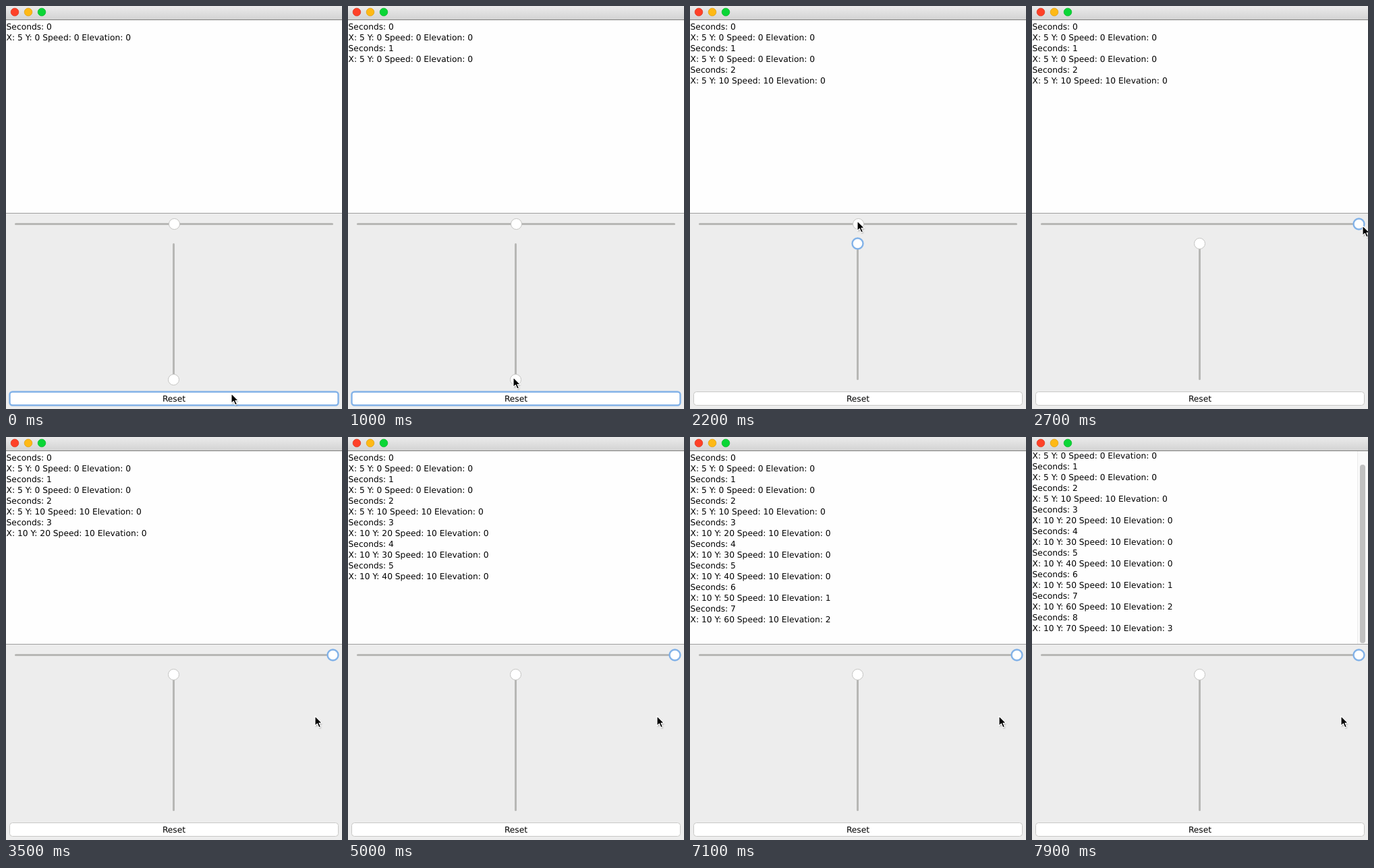
Write an HTML page that moves like this. It is 498 px wide and 598 px high and loops after 8000 ms.

```html
<!DOCTYPE html>
<html lang="en">
<head>
<meta charset="utf-8">
<title>Slider log</title>
<style>
  html, body { margin: 0; width: 100%; height: 100%; overflow: hidden; background: #ededed; }
  svg { display: block; width: 498px; height: 598px; }
  text {
    font: 12.25px "DejaVu Sans", Verdana, sans-serif;
    text-rendering: geometricPrecision;
    fill: #000;
    white-space: pre;
  }
  .track { stroke: #b7b7b5; stroke-width: 3; stroke-linecap: round; }
  .thumb { fill: #fff; stroke: #c4c4c2; stroke-width: 1; }
  .box { fill: #fff; stroke: #c8c8c6; stroke-width: 1; }
  .focus { stroke: #82b2e8; stroke-width: 2.4; }
</style>
</head>
<body>
<svg viewBox="0 0 498 598">
  <defs>
    <linearGradient id="bar" x2="0" y2="1">
      <stop offset="0" stop-color="#ebebeb"/>
      <stop offset="1" stop-color="#d3d3d3"/>
    </linearGradient>
    <clipPath id="view"><rect y="21" width="498" height="286"/></clipPath>
    <filter id="soft" x="-50%" y="-50%" width="200%" height="200%">
      <feGaussianBlur stdDeviation="1"/>
    </filter>
  </defs>

  <rect width="498" height="598" fill="#ededed"/>
  <rect width="498" height="20" fill="url(#bar)"/>
  <rect y="20" width="498" height="1" fill="#7c7c7a"/>
  <g stroke-width=".8">
    <circle cx="13" cy="9" r="5.8" fill="#ff4128" stroke="#dc3a22"/>
    <circle cx="33" cy="9" r="5.8" fill="#ffb915" stroke="#dfa016"/>
    <circle cx="53" cy="9" r="5.8" fill="#0ad636" stroke="#12b830"/>
  </g>

  <rect y="21" width="498" height="286" fill="#fefefe"/>
  <g clip-path="url(#view)">
    <g id="log"></g>
    <g id="scroll">
      <rect x="482" y="21" width="16" height="286" fill="#fafafa"/>
      <rect x="482" y="21" width="1" height="286" fill="#ececec"/>
      <rect x="486" y="41" width="8" height="265" rx="4" fill="#c1c1c1"/>
    </g>
  </g>
  <rect y="307" width="498" height="1" fill="#9e9e9e"/>

  <line class="track" x1="14.5" y1="323.5" x2="483.5" y2="323.5"/>
  <line class="track" x1="248.5" y1="353.5" x2="248.5" y2="553.5"/>
  <circle id="hThumb" class="thumb" cy="323.5" r="8"/>
  <circle id="vThumb" class="thumb" cx="248.5" r="8"/>

  <rect id="button" class="box" x="5.5" y="572.5" width="487" height="20" rx="4"/>
  <text x="249" y="587" text-anchor="middle">Reset</text>

  <g id="cursor">
    <path d="M1 2V16L4.3 13L7 18.5L9 17.5L6.8 12H11Z" fill="#000" opacity=".35" filter="url(#soft)"/>
    <path d="M0 0V14.5L3.4 11.4L5.8 17L8.4 15.9L6 10.5H10.4Z" fill="#000" stroke="#fff" stroke-width="1.1" stroke-linejoin="round"/>
  </g>
</svg>
<script>
  const LOOP = 8000, STEP = 100, LINE = 16, LEAD = 250, LAST = 8;
  const V_PRESS = 1100, V_DROP = 1600, H_PRESS = 2300, H_DROP = 2700;
  const $ = id => document.getElementById(id);

  // Pointer path: time, x, y
  const path = [
    [0, 334, 575], [900, 245, 551], [V_PRESS, 245, 551],
    [V_DROP, 246, 342], [1800, 246, 342], [2100, 248, 319], [H_PRESS, 248, 319],
    [H_DROP, 490, 326], [2900, 490, 326], [3400, 458, 414]
  ];

  const ease = k => k * k * (3 - 2 * k);
  const clamp = (v, lo, hi) => Math.min(hi, Math.max(lo, v));

  function pointer(t) {
    const i = path.findIndex(p => p[0] > t);
    if (i < 0) return path[path.length - 1].slice(1);
    const [t0, x0, y0] = path[i - 1], [t1, x1, y1] = path[i];
    const k = ease((t - t0) / (t1 - t0));
    return [x0 + (x1 - x0) * k, y0 + (y1 - y0) * k];
  }

  function report(n) {
    const x = n < 3 ? 5 : 10;
    const speed = n < 2 ? 0 : 10;
    const y = Math.max(0, n - 1) * 10;
    const elevation = Math.max(0, n - 5);
    return [`Seconds: ${n}`, `X: ${x} Y: ${y} Speed: ${speed} Elevation: ${elevation}`];
  }

  function addLine(str, row) {
    const el = document.createElementNS("http://www.w3.org/2000/svg", "text");
    el.setAttribute("x", 0.6);
    el.setAttribute("y", 35 + row * LINE);
    el.textContent = str;
    $("log").append(el);
    return el;
  }

  const lines = [];
  for (let n = 0; n <= LAST; n++)
    for (const str of report(n)) lines.push(addLine(str, lines.length));

  const show = (el, on) => el.setAttribute("visibility", on ? "visible" : "hidden");

  function draw(t) {
    const n = Math.min(LAST, Math.floor((t + LEAD) / 1000));
    const full = n === LAST;
    lines.forEach((el, i) => show(el, i < 2 * (n + 1)));
    $("log").setAttribute("transform", `translate(0 ${full ? -19 : 0})`);
    show($("scroll"), full);

    // Each thumb follows the pointer while held and stops at its track's end
    const held = pointer(clamp(t, H_PRESS, H_DROP))[0];
    const raised = pointer(clamp(t, V_PRESS, V_DROP))[1];
    $("hThumb").setAttribute("cx", clamp(held + 1.5, 13.5, 484.5));
    $("vThumb").setAttribute("cy", clamp(raised + 3.5, 352.5, 554.5));
    $("button").classList.toggle("focus", t < V_PRESS);
    $("vThumb").classList.toggle("focus", t >= V_PRESS && t < H_PRESS);
    $("hThumb").classList.toggle("focus", t >= H_PRESS);

    const [x, y] = pointer(t).map(Math.round);
    $("cursor").setAttribute("transform", `translate(${x} ${y})`);
  }

  const start = performance.now();
  function tick() {
    const t = (performance.now() - start) % LOOP;
    draw(Math.floor(t / STEP) * STEP);
    requestAnimationFrame(tick);
  }
  tick();
</script>
</body>
</html>
```
